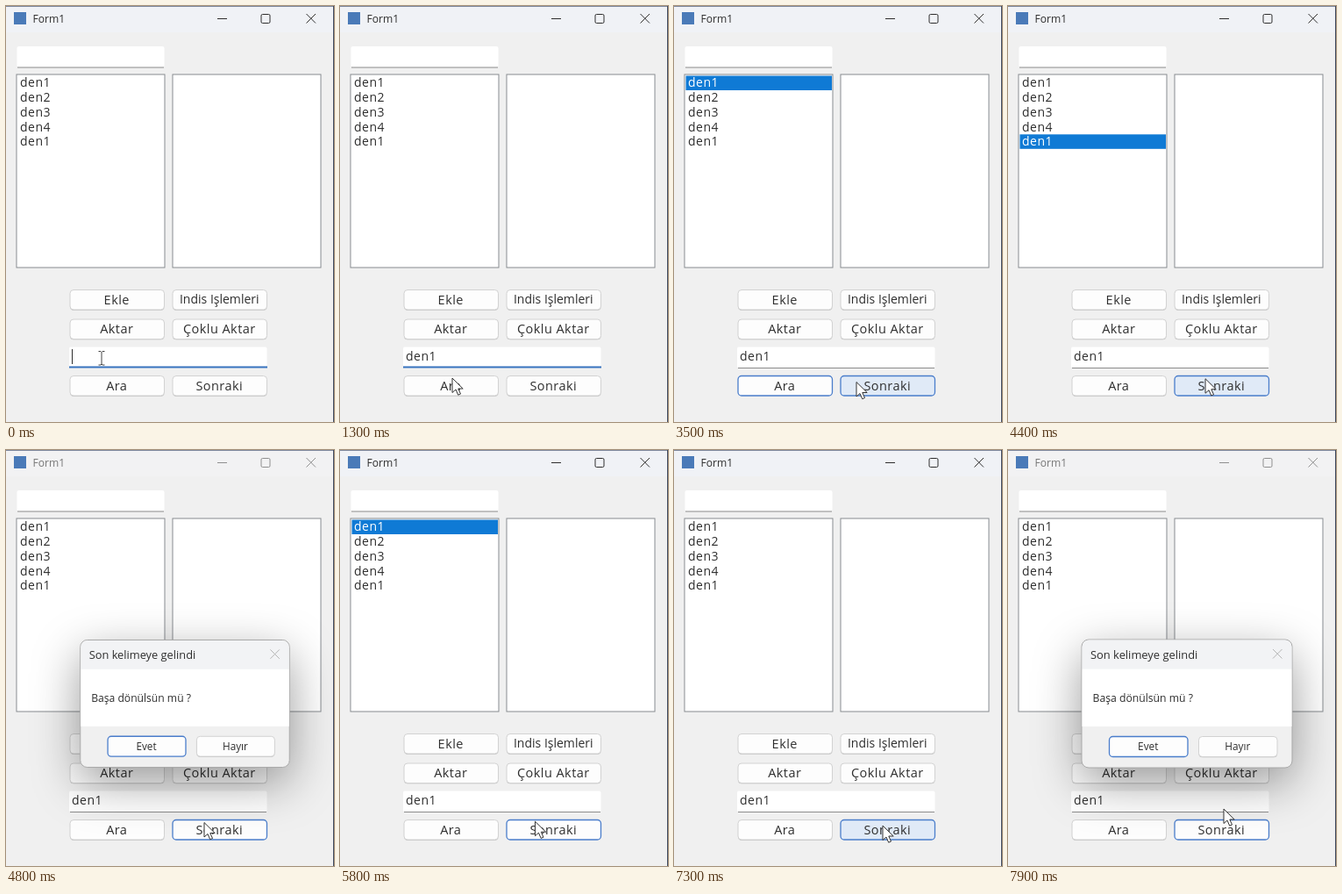
Recreate the animation shown at these times as an HTML page with a canvas. Size 374x474 px, loop 8 s.

```html
<!DOCTYPE html>
<html lang="tr">
<head>
<meta charset="utf-8">
<title>Form1</title>
<style>
html, body { margin: 0; width: 374px; height: 474px; overflow: hidden; background: #f0f0f0; }
canvas { display: block; }
</style>
</head>
<body>
<canvas id="stage" width="374" height="474"></canvas>
<script>
const ctx = document.getElementById('stage').getContext('2d');
const LOOP = 8000;
const INK = '#2e2e2e';
const BLUE = '#4a7dcb';
const ITEMS = ['den1', 'den2', 'den3', 'den4', 'den1'];

const BUTTONS = [
  { label: 'Ekle', x: 73, y: 323.5 },
  { label: 'Indis Işlemleri', x: 190, y: 323.5, size: 14, spacing: 0 },
  { label: 'Aktar', x: 73, y: 357 },
  { label: 'Çoklu Aktar', x: 190, y: 357 },
  { label: 'Ara', x: 73, y: 421.5 },
  { label: 'Sonraki', x: 190, y: 421.5 },
].map(b => ({ w: 107.5, h: 22.5, size: 14.5, spacing: 0.45, ...b }));

const DIALOG_BUTTONS = [
  { label: 'Evet', x: 115.5 },
  { label: 'Hayır', x: 217.5 },
].map(b => ({ y: 326.5, w: 89.5, h: 23, size: 11.8, spacing: 0, ...b }));

// Stepped state: [time, value]
const TYPED = [[0, ''], [200, 'd'], [300, 'de'], [600, 'den'], [1000, 'den1']];
const SELECTED = [[0, -1], [2750, 0], [3750, 4], [4600, -1], [5500, 0], [5950, 4], [6150, -1]];
const FOCUS = [[0, 'search'], [2700, 'Ara'], [3700, 'Sonraki']];
const PRESSES = [
  [2700, 'Ara'], [3700, 'Sonraki'], [4550, 'Sonraki'], [5400, 'Evet'],
  [5900, 'Sonraki'], [6100, 'Sonraki'], [6660, 'Hayır'], [7450, 'Sonraki'],
];
const DIALOGS = [[4650, 5500], [6200, 6820], [7550, 9000]];

// Pointer path: [time, x, y]
const PATH = [
  [1200, 109, 398], [1300, 128, 424], [1700, 147, 428], [2900, 147, 428],
  [3350, 208, 428.5], [4100, 208, 428.5], [4450, 226, 424.5], [4900, 226, 424.5],
  [5300, 160, 338], [5500, 160, 338], [5850, 226, 428], [6250, 226, 428],
  [6600, 264, 338], [6850, 264, 338], [7250, 238, 428], [7600, 238, 428],
  [7900, 246, 409], [8000, 248, 402],
];

const clamp = v => Math.max(0, Math.min(1, v));
const stateAt = (steps, t) => steps.filter(s => s[0] <= t).pop()[1];

function pointerAt(t) {
  const i = PATH.findIndex(p => p[0] > t);
  if (i < 1) return PATH[0].slice(1);
  const [t0, x0, y0] = PATH[i - 1], [t1, x1, y1] = PATH[i];
  const p = (t - t0) / (t1 - t0), e = p * p * (3 - 2 * p);
  return [x0 + (x1 - x0) * e, y0 + (y1 - y0) * e];
}

function rect(x, y, w, h, color) {
  ctx.fillStyle = color;
  ctx.fillRect(x, y, w, h);
}

function text(str, x, y, size, color = INK, { align = 'left', spacing = 0 } = {}) {
  ctx.font = `${size}px "Open Sans", "Noto Sans", sans-serif`;
  ctx.letterSpacing = spacing + 'px';
  ctx.textAlign = align;
  ctx.textBaseline = 'alphabetic';
  ctx.fillStyle = color;
  ctx.fillText(str, x, y + size * 0.355);
}

function strokePath(d, color) {
  ctx.strokeStyle = color;
  ctx.lineWidth = 1;
  ctx.stroke(new Path2D(d));
}

function roundRect(x, y, w, h, r, fill, stroke, width = 1) {
  ctx.beginPath();
  ctx.roundRect(x, y, w, h, r);
  ctx.fillStyle = fill;
  ctx.fill();
  if (stroke) {
    ctx.strokeStyle = stroke;
    ctx.lineWidth = width;
    ctx.stroke();
  }
}

function drawButton(b, { hover, pressed, focused }) {
  const fill = pressed ? '#c9e0f7' : hover ? '#e0eaf7' : '#fdfdfd';
  const active = hover || pressed || focused;
  if (!active) roundRect(b.x, b.y + 0.7, b.w, b.h, 4, '#bdbdbd');
  roundRect(b.x, b.y, b.w, b.h, 4, fill, active ? BLUE : '#d2d2d2', active ? 1.3 : 1);
  text(b.label, b.x + b.w / 2 - 0.5, b.y + b.h / 2 - 0.3, b.size, INK,
    { align: 'center', spacing: b.spacing });
}

function drawButtons(buttons, t, focus, enabled) {
  const [px, py] = pointerAt(t - 100);
  for (const b of buttons) {
    const hover = enabled && px > b.x && px < b.x + b.w && py > b.y && py < b.y + b.h;
    const pressed = PRESSES.some(([at, label]) => label === b.label && t >= at && t < at + 140);
    drawButton(b, { hover, pressed, focused: focus === b.label });
  }
}

function drawWindow(t, active) {
  rect(0, 0, 374, 474, '#f0f0f0');
  rect(0, 0, 374, 30, active ? '#f0f2f6' : '#f2f2f3');
  const ink = active ? INK : '#8f8f8f';
  rect(9, 7, 14, 14, '#4a7ab8');
  text('Form1', 30.5, 14.5, 12.1, active ? INK : '#777');
  strokePath('M241 14.5h11', ink);
  strokePath('M292.5 9.5h7q1.5 0 1.5 1.5v7q0 1.5-1.5 1.5h-7q-1.5 0-1.5-1.5v-7q0-1.5 1.5-1.5z', ink);
  strokePath('M342.5 9l10.5 10.5m0-10.5l-10.5 10.5', ink);

  roundRect(12.5, 46, 168, 24, 2, '#fff');
  rect(13, 69.5, 167, 1, '#8c8c8c');
  for (const x of [12, 190]) {
    rect(x - 0.5, 77.5, 170, 221, '#878b90');
    rect(x + 0.5, 78.5, 168, 219, '#fff');
  }
  const selected = stateAt(SELECTED, t);
  ITEMS.forEach((item, i) => {
    const y = 87.5 + i * 16.7;
    if (i === selected) rect(13.5, y - 8, 166.5, 16.5, '#0f7ad5');
    text(item, 16, y, 14, i === selected ? '#fff' : INK, { spacing: 0.5 });
  });
}

function drawSearch(t, focused) {
  roundRect(72, 388.5, 225.5, 24, 2, '#fff');
  if (focused) rect(72, 410.5, 226, 2, '#3672bd');
  else rect(73, 412, 224, 1, '#8c8c8c');
  const typed = stateAt(TYPED, t);
  text(typed, 75, 399.2, 14, INK, { spacing: 0.5 });
  if (t < 1200) rect(75 + ctx.measureText(typed).width, 391, 1, 17, INK);
}

function drawDialog(t, [open, close]) {
  const p = clamp((t - open) / 250);
  const scale = 1 - 0.1 * (1 - p) ** 3;
  ctx.save();
  ctx.globalAlpha = clamp(p * 2) * (1 - clamp((t - close) / 120));
  ctx.translate(204, 289);
  ctx.scale(scale, scale);
  ctx.translate(-204, -289);

  ctx.save();
  ctx.shadowColor = 'rgba(0,0,0,.4)';
  ctx.shadowBlur = 54;
  ctx.shadowOffsetY = 17;
  roundRect(84, 216, 240, 146, 8, '#f0f0f0');
  ctx.restore();
  roundRect(84, 216, 240, 146, 8, '#f0f0f0', '#a9a9a9');
  roundRect(84.5, 216.5, 239, 33, [8, 8, 0, 0], '#f2f3f5');
  rect(84.5, 249.5, 239, 65.5, '#fff');
  text('Son kelimeye gelindi', 94, 233, 12.9);
  strokePath('M302 227l10.5 10.5m0-10.5l-10.5 10.5', '#b5b5b5');
  text('Başa dönülsün mü ?', 96.5, 283, 12.2);
  const focus = t >= 6660 && t < 7000 ? 'Hayır' : 'Evet';
  drawButtons(DIALOG_BUTTONS, t, focus, true);
  ctx.restore();
}

function drawPointer(t) {
  if (t < 200) {
    strokePath('M105.5 393.5h2.5l1 1 1-1h2.5M109 394.5v13.5M105.5 409h2.5l1-1 1 1h2.5', '#444');
  }
  if (t < 1200) return;
  ctx.save();
  ctx.translate(...pointerAt(t));
  const arrow = new Path2D('M0 0V16.5L4 13 6.7 19.2 9.5 18 6.8 12H12.2Z');
  ctx.fillStyle = '#fff';
  ctx.fill(arrow);
  ctx.strokeStyle = '#333';
  ctx.lineWidth = 1;
  ctx.lineJoin = 'round';
  ctx.stroke(arrow);
  ctx.restore();
}

function draw(t) {
  const dialog = DIALOGS.find(([open, close]) => t >= open && t < close + 120);
  const active = !dialog || t >= dialog[1];
  const focus = stateAt(FOCUS, t);
  drawWindow(t, active);
  drawButtons(BUTTONS, t, focus, active);
  drawSearch(t, focus === 'search');
  if (dialog) drawDialog(t, dialog);
  rect(0, 0, 374, 1, '#7d879c');
  rect(373, 0, 1, 474, '#3c465c');
  drawPointer(t);
}

function tick() {
  draw(performance.now() % LOOP);
  requestAnimationFrame(tick);
}
tick();
</script>
</body>
</html>
```
